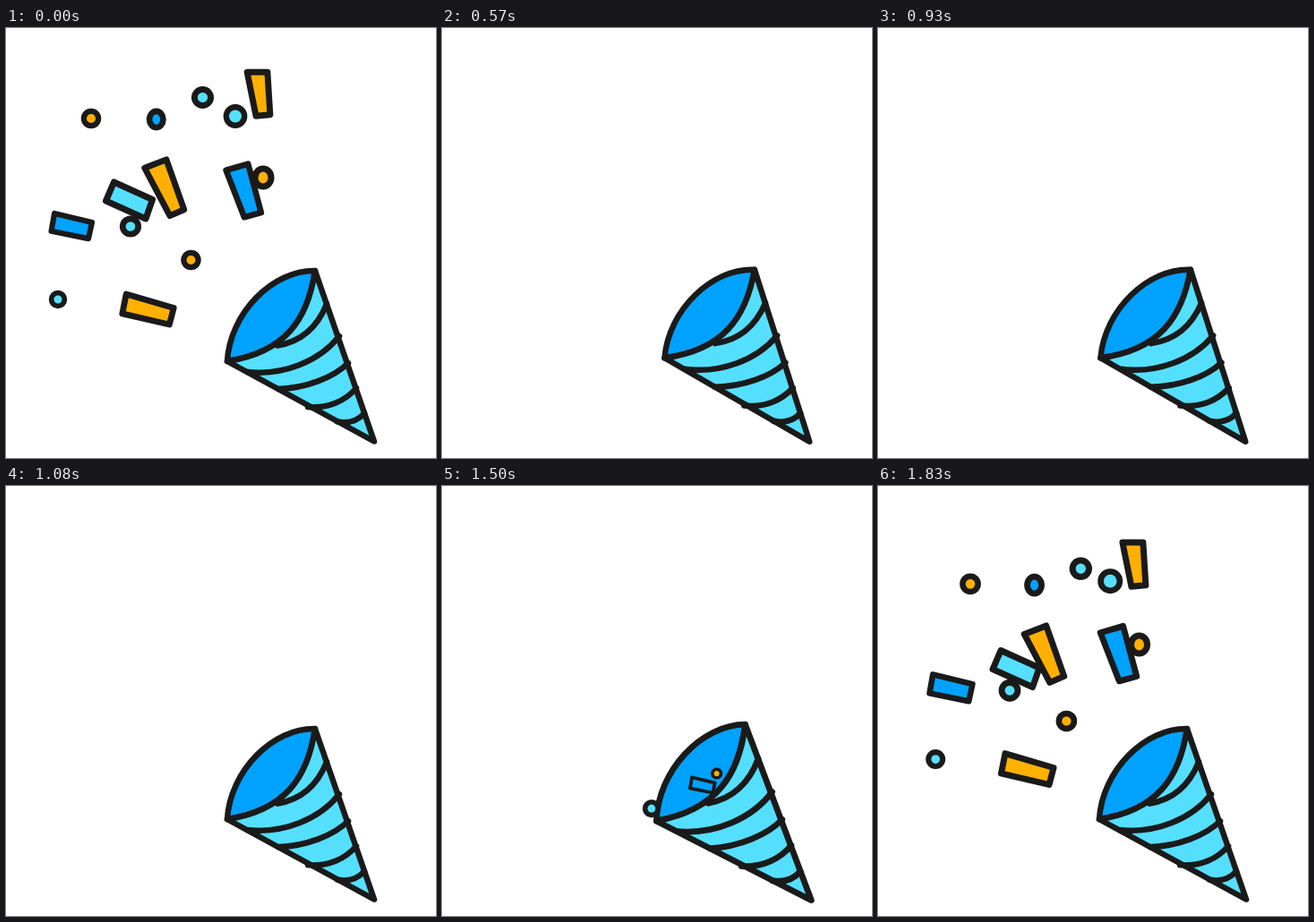
These frames come from a looping animation (480x480 px, 1860 ms). An HTML page:

```html
<!DOCTYPE html>
<html lang="en">
<head>
<meta charset="utf-8">
<title>Party popper</title>
<style>
  html, body { margin: 0; width: 100%; height: 100%; overflow: hidden; background: #fff; }
  svg { display: block; width: 100vw; height: 100vh; }
  .ink { stroke: #1a1a1a; stroke-width: 6.5; stroke-linejoin: round; stroke-linecap: round; }
  .bit { stroke-width: 7; }
</style>
</head>
<body>
<svg viewBox="0 0 480 480">
  <g class="cone ink">
    <path fill="#00a2ff" d="M247 372C250 318 298 270 345 271C337 325 312 362 247 372Z"/>
  </g>
  <g id="confetti"></g>
  <g class="cone ink">
    <path fill="#55dfff" d="M345 271L411 461.500L247 372C312 362 337 325 345 271Z"/>
    <path fill="none" d="M303 354.500Q342 348 358 308M270 384C310 388 350 372 372 344M304 403C335 402 366 390 382 374M337 423C360 425 379 416 391 402M370 439.500C384 442 394 437 400 430"/>
  </g>
</svg>
<script>
const LOOP = 1860, STEP = 30;
const FLIGHT = 770, GROW = 115, SHRINK = 370, GONE = 105;
const BLUE = '#00a2ff', CYAN = '#55dfff', GOLD = '#ffb000';

// colour, position at 0 ms, position at 180 ms, landing time, shape (radii or polygon)
const bits = [
  [GOLD, 95, 101, 69.5, 74.5, 350, [9.2, 9.2]],
  [BLUE, 167.8, 102, 145, 73, 385, [8.2, 9.7]],
  [CYAN, 219.5, 77.5, 195, 24.5, 432, [9.2, 9.2]],
  [CYAN, 256, 98.5, 245.5, 73.5, 364, [11.2, 11.2]],
  [GOLD, 282.5, 73, 268.5, 23, 435, '-13.5,-24 9.5,-24 12.5,24 -3.5,25.5'],
  [CYAN, 137.5, 192.5, 73, 147.5, 510, '-17,-20.5 26,-1 18.5,20.5 -26,.5'],
  [GOLD, 177, 178, 145.5, 144, 435, '-22.5,-22 2,-31.5 22,25 6,32'],
  [GOLD, 287, 167, 270, 129.5, 471, [9, 10]],
  [BLUE, 265, 181, 254, 162, 388, '-20.5,-23.5 5.5,-31 21,26.5 1,32'],
  [BLUE, 73.5, 221, 47.5, 207.5, 348, '-22,-16 25.5,-4.5 21,16 -26,6.5'],
  [CYAN, 139, 221.5, 111, 198, 409, [9, 9]],
  [GOLD, 206.5, 259, 194, 248, 357, [9, 9]],
  [GOLD, 159, 314, 130, 307, 414, '-25.5,-17.5 29,-1.5 24,17.5 -30,5'],
  [CYAN, 58, 303, 39.5, 297, 317, [9, 9]]
];

// cone recoil: time and squash amount
const recoil = [[1170, 0], [1350, 2], [1560, -2], [1800, 0]];

const clamp = x => Math.min(1, Math.max(0, x));
const smooth = x => x * x * (3 - 2 * x);
const cones = document.querySelectorAll('.cone');
const box = document.getElementById('confetti');

function make([fill, , , , , , shape]) {
  const round = Array.isArray(shape);
  const el = document.createElementNS('http://www.w3.org/2000/svg', round ? 'ellipse' : 'polygon');
  if (round) {
    el.setAttribute('rx', shape[0]);
    el.setAttribute('ry', shape[1]);
  } else {
    el.setAttribute('points', shape);
  }
  el.setAttribute('fill', fill);
  el.setAttribute('class', 'ink bit');
  return box.appendChild(el);
}
const nodes = bits.map(make);

function recoilAt(t) {
  for (let i = 1; i < recoil.length; i++) {
    const [t0, a] = recoil[i - 1], [t1, b] = recoil[i];
    if (t >= t0 && t < t1) return a + (b - a) * smooth((t - t0) / (t1 - t0));
  }
  return 0;
}

function drawCone(t) {
  let turn = 0, size = 1;
  if (t >= 540 && t < 1080) {
    const phase = (t - 540) % 180 / 180;
    turn = 4.2 * (1 - Math.abs(2 * phase - 1));
  } else {
    const squash = recoilAt(t);
    turn = 1.25 * squash;
    size = 1 - 0.033 * squash;
  }
  const pose = `translate(400 430) rotate(${turn}) scale(${size}) translate(-400 -430)`;
  cones.forEach(c => c.setAttribute('transform', pose));
}

function drawBit(el, [, x0, y0, x1, y1, land], t) {
  const start = land - FLIGHT;
  // distance left to travel, slowing down cubically
  const left = at => Math.pow(clamp((land - at) / FLIGHT), 3);
  const k = (left(t) - left(180)) / (left(0) - left(180));
  const out = clamp((t - land + GONE + SHRINK) / SHRINK);
  const size = clamp((t - start) / GROW) * (1 - out * out);
  el.setAttribute('visibility', size > 0.01 ? 'visible' : 'hidden');
  el.setAttribute('transform',
    `translate(${x1 + (x0 - x1) * k} ${y1 + (y0 - y1) * k}) scale(${size})`);
}

function draw(ms) {
  const t = Math.floor(ms % LOOP / STEP) * STEP;
  const flight = t > 900 ? t - LOOP : t;
  drawCone(t);
  nodes.forEach((el, i) => drawBit(el, bits[i], flight));
}

const begin = performance.now();
function tick() {
  draw(performance.now() - begin);
  requestAnimationFrame(tick);
}
tick();
</script>
</body>
</html>
```
